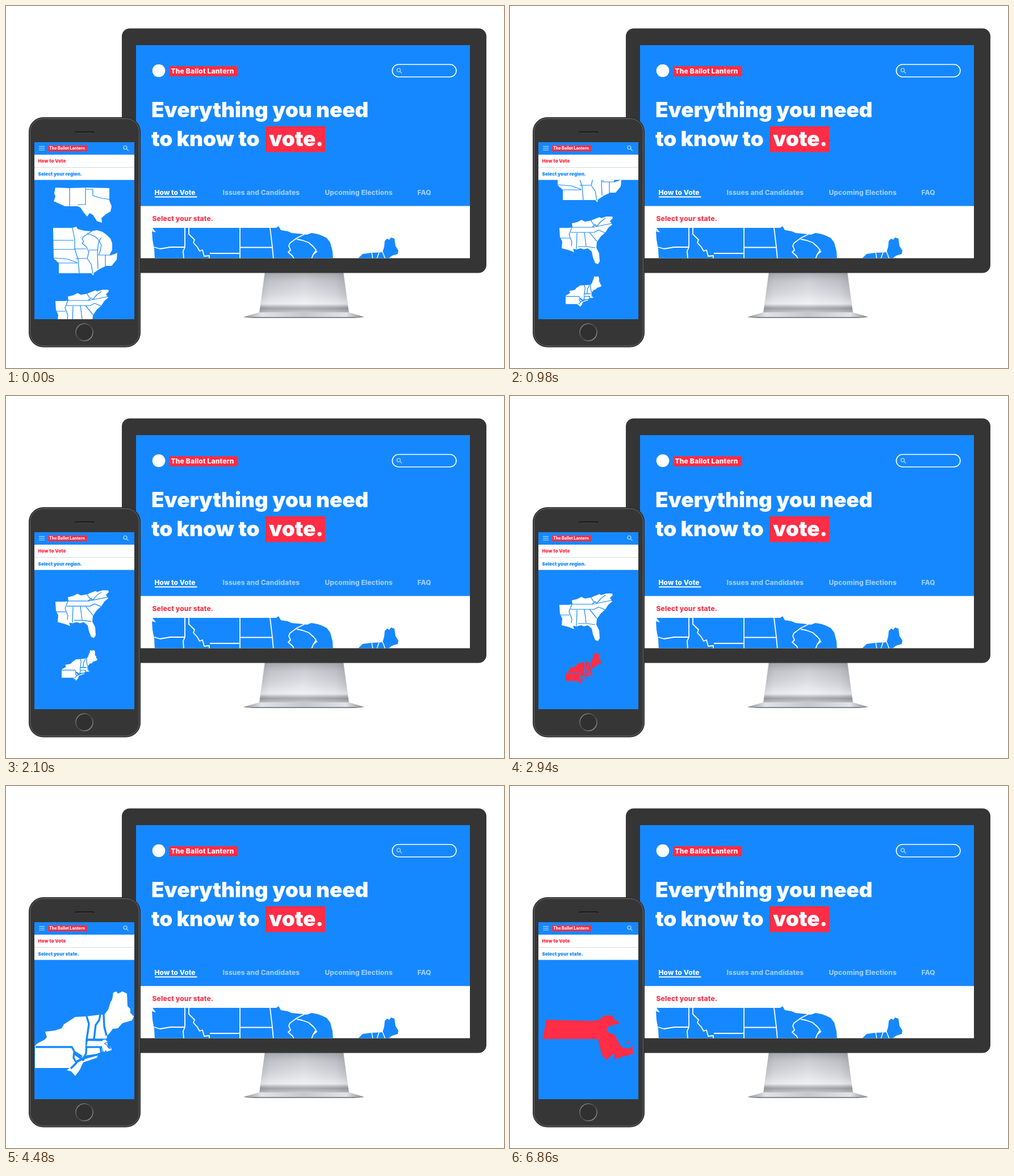
Animation, 877 px wide and 638 px high, one loop 8 s. Source, as an HTML page:

```html
<!DOCTYPE html>
<html lang="en">
<head>
<meta charset="utf-8">
<title>Voting guide on desktop and phone</title>
<style>
  html, body { margin: 0; height: 100%; overflow: hidden; background: #fff; }
  svg { display: block; width: 877px; height: 638px; }
  text { font-family: Inter, sans-serif; font-weight: 800; font-optical-sizing: none; white-space: pre; }
  .blue { fill: #1688ff; }
  .red { fill: #ff2d46; }
  .white { fill: #fff; }
  .pale { fill: #9bcdff; }
  .headline { font-size: 37px; font-weight: 900; letter-spacing: -.1px; }
  .nav { font-size: 12px; letter-spacing: .06px; }
  .label { font-size: 12px; letter-spacing: .18px; }
  .small { font-size: 8px; font-weight: 900; letter-spacing: .08px; }
  .line { fill: none; stroke-linejoin: round; }
  .region .line { stroke: #1688ff; stroke-width: 1.2; }
  #northeast .line { stroke-width: 3.4; }
  #state { stroke: #1688ff; stroke-width: 9; paint-order: stroke; }
</style>
</head>
<body>
<svg viewBox="0 0 877 638">
  <defs>
    <linearGradient id="neck" x2="1" y2="0">
      <stop offset="0" stop-color="#b4b6bc"/><stop offset=".12" stop-color="#d0d1d7"/>
      <stop offset=".5" stop-color="#dfe0e6"/><stop offset=".85" stop-color="#cdced4"/>
      <stop offset="1" stop-color="#b0b2b8"/>
    </linearGradient>
    <linearGradient id="shade" x2="0" y2="1">
      <stop offset="0" stop-color="#55575e" stop-opacity=".4"/><stop offset=".25" stop-color="#777" stop-opacity=".15"/>
      <stop offset=".6" stop-color="#fff" stop-opacity=".2"/><stop offset=".78" stop-color="#fff" stop-opacity=".55"/>
      <stop offset=".89" stop-color="#666870" stop-opacity=".45"/><stop offset="1" stop-color="#bbb" stop-opacity=".5"/>
    </linearGradient>
    <linearGradient id="foot" x2="1" y2="0">
      <stop offset="0" stop-color="#8d8f95"/><stop offset=".15" stop-color="#e2e3e8"/>
      <stop offset=".5" stop-color="#c5c7cd"/><stop offset=".85" stop-color="#e2e3e8"/>
      <stop offset="1" stop-color="#85878d"/>
    </linearGradient>
    <linearGradient id="ring" x2="1" y2="1">
      <stop offset="0" stop-color="#999"/><stop offset=".5" stop-color="#444"/><stop offset="1" stop-color="#aaa"/>
    </linearGradient>
    <clipPath id="desktop"><rect x="229" y="69" width="588" height="375.5"/></clipPath>
    <clipPath id="mobile"><rect x="50" y="240" width="176" height="312"/></clipPath>
    <g id="lens" fill="none">
      <circle r="3"/><path d="M2.2 2.2L5.6 5.6"/>
    </g>
  </defs>

  <!-- Monitor -->
  <path d="M456 468H594L604 541H446Z" fill="url(#neck)"/>
  <path d="M456 468H594L604 541H446Z" fill="url(#shade)"/>
  <path d="M446 540H604L631 548Q525 552 418 548Z" fill="url(#foot)"/>
  <path d="M418 548H631Q620 550 605 550H444Q428 550 418 548Z" fill="#85878d"/>
  <rect x="204" y="39.5" width="642" height="431" rx="14" fill="#353535"/>
  <g clip-path="url(#desktop)">
    <rect class="white" x="229" y="69" width="588" height="376"/>
    <rect class="blue" x="229" y="69" width="588" height="283.5"/>
    <circle class="white" cx="269" cy="114" r="11.3"/>
    <rect class="red" x="287" y="106" width="121.5" height="18"/>
    <text class="white label" x="290.5" y="118.5">The Ballot Lantern</text>
    <rect x="680.3" y="103" width="112.6" height="22" rx="11" fill="none" stroke="#fff" stroke-width="1.6"/>
    <use href="#lens" x="691.5" y="113" stroke="#9bcdff" stroke-width="1.5"/>
    <text class="white headline" x="256" y="196">Everything you need</text>
    <text class="white headline" x="256" y="247">to know to</text>
    <rect class="red" x="457" y="212" width="105" height="45.5"/>
    <text class="white headline" x="463" y="247">vote.</text>
    <text class="white nav" x="261.5" y="333.3">How to Vote</text>
    <rect class="white" x="262" y="335.5" width="74.5" height="2"/>
    <text class="pale nav" x="381.5" y="333.3">Issues and Candidates</text>
    <text class="pale nav" x="561.5" y="333.3">Upcoming Elections</text>
    <text class="pale nav" x="724.5" y="333.3">FAQ</text>
    <text class="red label" x="257.5" y="379">Select your state.</text>
    <path class="blue" d="M258 391H476L480 388 484 395 496 397 503 400 523 402 530 403 538 400 549 402 557 405 565 409 571 417 575 432 576 447H262L261 428 258 412 257 397 264 399Z"/>
    <path class="line" stroke="#fff" stroke-width="1.8" d="M261 425L271 428 289 425H315M315 391V425L312 432 313 446M322 391V402L332 412 330 417 337 425 341 432 346 430 349 441 358 440V446M359 436H412M412 391V446M412 425.5H469M465 391L469 425 471 446M526 402L512 409 500 418 498 423 501 430 497 434 505 441 507 446M512 411L522 413 533 417 541 424 546 430 541 438 548 432M541 438L538 446"/>
    <path class="blue" d="M619 446L628 437 643 435 663 434 666 424 667 414 671 410 675 412 678 408 684 410 686 423 691 431 690 437 680 440 672 446Z"/>
    <path class="line" stroke="#fff" stroke-width="1.5" d="M644 434L646 446M657 434L653 446M663 433L668 446"/>
  </g>

  <!-- Phone -->
  <rect x="40.5" y="196.5" width="196" height="404.5" rx="25" fill="#363636" stroke="#2b2b2b"/>
  <rect x="42.5" y="198.5" width="192" height="400.5" rx="23" fill="none" stroke="#686868"/>
  <path d="M123 222.5H154" stroke="#191919" stroke-width="3" stroke-linecap="round"/>
  <path d="M123 223.5H154" stroke="#555" stroke-width=".7"/>
  <circle cx="138" cy="575" r="15" fill="#303030" stroke="url(#ring)" stroke-width="1.5"/>
  <g clip-path="url(#mobile)">
    <rect class="blue" x="50" y="239" width="176" height="313"/>
    <g class="white region" id="passed">
      <path d="M87 320L110 321 141 320 182 321V343L186 353 184 362 176 367 168 374 169 382 160 379 153 368 147 365 143 371 137 364 131 355 126 353H104L84 344 87 336 85 330Z"/>
      <path class="line" d="M112 320V355M140 320V350H126M141 323H153V334L162 337 170 339 183 341"/>
      <path d="M83 391H117L124 389 126 393 138 396 150 397 160 395 170 398 178 404 184 410 187 418V430L182 439 189 438 196 435 195 447 186 458 176 458 164 464 155 470 154 475 150 471H93V453L84 445Z"/>
      <path class="line" d="M83 413H119M83 429H121M83 444L108 446 125 452M93 453H126M117 391L121 412V428L127 447 129 471M121 428H141M123 445H142M151 397L143 402 136 407 134 411 137 415 134 418 141 424 146 433 143 445 150 455 153 472M146 430H161M143 402L149 403 156 406 161 410 164 414 162 422 161 437 162 463M164 414L168 408M164 414L168 421 166 432 163 439H186M175 439V459"/>
    </g>
    <g id="zoom">
      <g class="white region" id="southeast">
        <path d="M87 368H104L110 367 109 360 118 358 126 354 132 357 143 355 150 352 158 349 160 351 170 348H180L181 351 176 356 180 362 173 368 168 376 160 383 153 393 152 403 157 413 158 427 155 432 150 430 146 420 144 410 137 404 130 406 125 404 117 406 111 405 113 411 103 407 91 404 92 392 88 384Z"/>
        <path class="line" d="M88 386H105M109 367L104 380 109 393 108 400M118 377L117 405M131 376L134 400M107 376H148L156 372 168 377M109 367H145L180 360M140 376L153 392M120 401H135L150 403M142 354L147 362 153 365 160 357 168 351M145 366L151 362"/>
      </g>
      <g class="region" transform="translate(98 453) scale(.3617) translate(-51 -361)">
        <g id="northeast">
          <path d="M51 497V458L55 454 68 447 72 443 69 433 86 431 98 427 102 420 122 407 142 406 166 403H173L180 394 184 381 187 376 189 364 194 362 197 366 205 362 213 366 214 388 219 393V400L225 406 222 413 205 418 197 427 188 428 183 435 178 440 177 447 180 461 170 468 160 472 140 475 124 484 124 489 136 482 162 475 160 479 136 487 130 500 122 511 115 503 107 501 112 497Z"/>
          <path class="line" d="M52 460H116L121 469 134 477M120 469L119 479 124 488 114 498M121 472L136 483 140 476M142 406L146 419 144 434 142 447 141 471 137 479M166 403L164 413 158 421 155 446M172 402L173 424 177 440M142 447H178M141 460H175M166 460L168 471"/>
        </g>
        <path id="state" transform="translate(142 447) scale(.274) translate(-57 -404)" d="M57 446L64 412 145 414 158 412 164 405 180 404 183 411 188 413 188 417 194 416 193 419 182 421 172 425 170 430 174 435 184 438 189 448 196 460 208 463 214 460 213 453 204 453 208 449 215 455 217 472 195 478 184 482V472L178 475 170 483 162 474 158 460 155 446Z"/>
      </g>
    </g>
    <g id="prompt">
      <rect class="white" x="50" y="284" width="176" height="22.5"/>
      <text class="blue small" id="promptText" x="56.5" y="298.5"></text>
    </g>
    <rect class="blue" x="50" y="239" width="176" height="23"/>
    <path d="M58 247.5H68M58 250.7H68M58 253.9H68" stroke="#c5e1ff" stroke-width="1"/>
    <rect class="red" x="74" y="245.5" width="69" height="10.5"/>
    <text class="white" font-size="7" x="76" y="253.2">The Ballot Lantern</text>
    <use href="#lens" x="210" y="249.5" stroke="#c5e1ff" stroke-width="1.1"/>
    <rect class="white" x="50" y="262" width="176" height="22.5"/>
    <rect x="50" y="284" width="176" height="1" fill="#d5dbe2"/>
    <text class="red small" x="56.5" y="276">How to Vote</text>
  </g>
</svg>
<script>
const LOOP = 8000, STEP = 70;
const RED = [255, 45, 70], WHITE = [255, 255, 255];
const get = id => document.getElementById(id);
const progress = (t, start, end) => Math.min(1, Math.max(0, (t - start) / (end - start)));
const easeOut = u => Math.sin(u * Math.PI / 2);
const easeInOut = u => u < .5 ? 4 * u ** 3 : 1 - 4 * (1 - u) ** 3;
const mix = (a, b, u) => `rgb(${a.map((v, i) => Math.round(v + (b[i] - v) * u))})`;

// Moves point (x, y) to (toX, toY) while everything grows by factor.
function zoom(x, y, toX, toY, factor, u) {
  return `translate(${(toX - x * factor) * u} ${(toY - y * factor) * u}) scale(${1 + (factor - 1) * u}) `;
}

function draw(now) {
  const t = Math.floor(now % LOOP / STEP) * STEP;

  const scroll = 168 * easeOut(progress(t, 10, 1750));
  const settle = 16 * easeInOut(progress(t, 1750, 2380));
  const toRegion = easeInOut(progress(t, 2940, 3710));
  const toState = easeInOut(progress(t, 6510, 6860));

  get('passed').setAttribute('transform', `translate(0 ${-scroll})`);
  get('passed').setAttribute('opacity', 1 - toRegion);
  get('zoom').setAttribute('transform',
    zoom(142, 447, 57, 404, 3.65, toState) +
    zoom(98, 453, 51, 361, 2.765, toRegion) +
    `translate(0 ${152 - scroll + settle})`);

  const regionColor = mix(t < 2940 ? WHITE : RED, WHITE, toRegion);
  get('southeast').setAttribute('opacity', 1 - toRegion);
  get('northeast').setAttribute('opacity', 1 - toState);
  get('northeast').setAttribute('fill', regionColor);
  get('state').setAttribute('fill', t < 6230 ? regionColor : `rgb(${RED})`);

  const hidden = toRegion - easeInOut(progress(t, 3780, 4480));
  get('prompt').setAttribute('transform', `translate(0 ${-22.5 * hidden})`);
  get('promptText').textContent = t < 3745 ? 'Select your region.' : 'Select your state.';
}

function tick() {
  draw(performance.now());
  requestAnimationFrame(tick);
}
tick();
</script>
</body>
</html>
```
